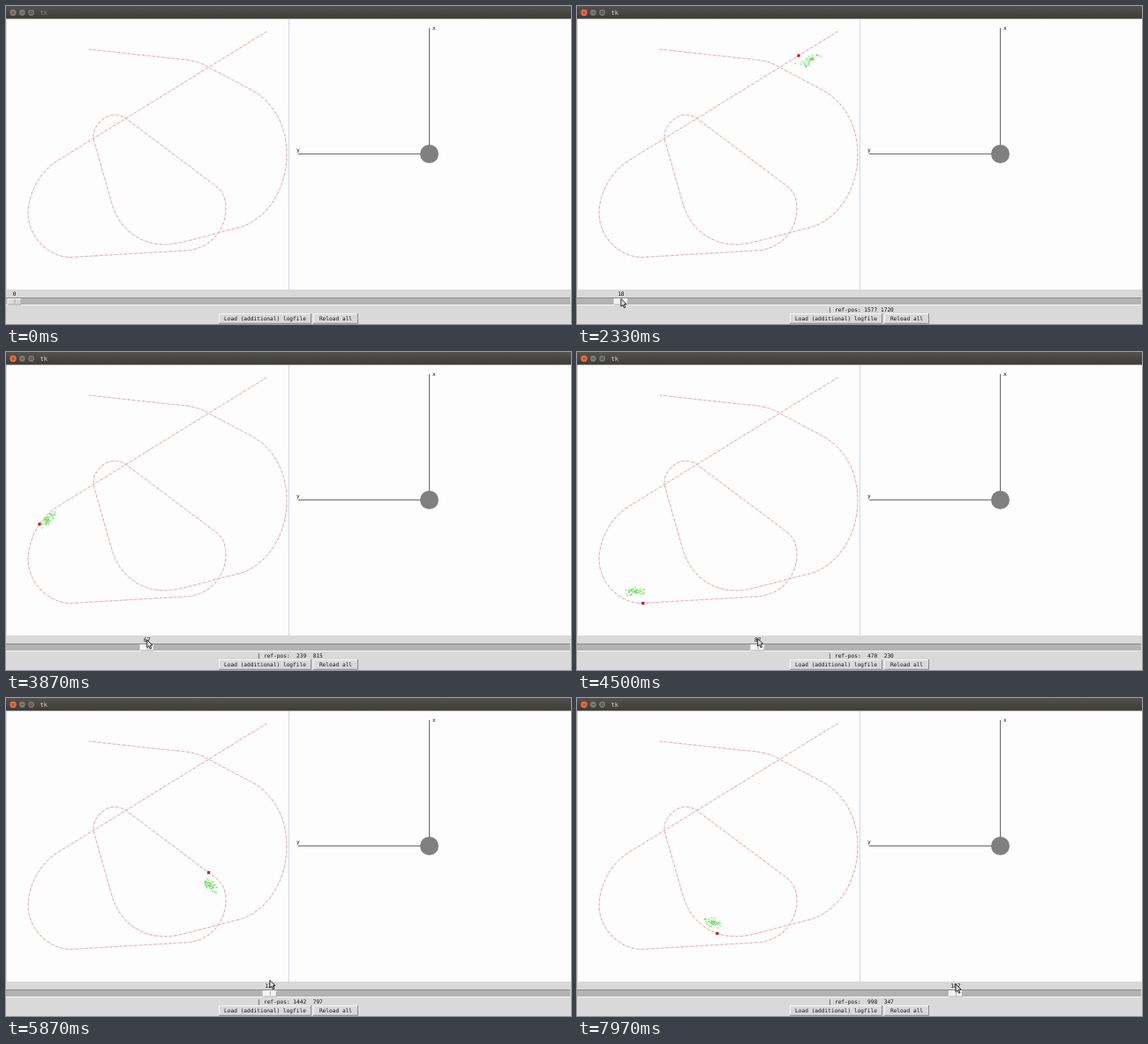
An HTML page that plays this animation: 640x360 px, repeating every 8000 ms.

```html
<!DOCTYPE html>
<html lang="en">
<head>
<meta charset="utf-8">
<title>tk</title>
<style>
  html, body { margin: 0; width: 100%; height: 100%; overflow: hidden; background: #fdfdfd; }
  svg { display: block; width: 100vw; height: 100vh; }
  text { font: 6.18px "DejaVu Sans Mono", monospace; fill: #111; white-space: pre; }
  path { fill: none; }
  .mid { text-anchor: middle; }
  #title { font-size: 7px; fill: #8d8b86; }
  #close, .button { fill: #7b7a75; }
  #knob { fill: #d9d9d9; }
  .focused #title { fill: #dfdbd2; }
  .focused #close { fill: #ee6a40; }
  .focused #knob { fill: #f4f4f4; }
  .axis { stroke: #6a6a6a; }
  .trail { stroke: #efd0ee; }
  .dots { stroke: #f5a884; stroke-width: 1.1; stroke-dasharray: 1.8 3.8; }
  .cloud { stroke: #70e060; }
  .light { stroke: #f6f6f6; }
  .dark { stroke: #8a8a8a; }
</style>
</head>
<body>
<svg viewBox="0 0 640 360">
  <defs>
    <linearGradient id="bar" x2="0" y2="1">
      <stop offset="0" stop-color="#53524d"/>
      <stop offset="1" stop-color="#3c3b37"/>
    </linearGradient>
  </defs>
  <rect width="640" height="360" fill="#fdfdfd"/>
  <rect width="640" height="14.5" fill="url(#bar)"/>
  <circle id="close" cx="8" cy="7.5" r="3.7"/>
  <circle class="button" cx="18.3" cy="7.5" r="3.4"/>
  <circle class="button" cx="28.6" cy="7.5" r="3.4"/>
  <path d="M6.7 6.2l2.6 2.6m0-2.6l-2.6 2.6M16.8 7.5h3M27.3 6.3h2.6v2.4h-2.6z" stroke="#403e3a" stroke-width=".7"/>
  <text id="title" x="38.5" y="10">tk</text>

  <path d="M.5 15V321M320.5 15V321" stroke="#d6d6e8"/>
  <path class="trail" d="M295 29L60 174C38 187 25 212 25 236C26 262 48 284 73 284.5L207 276.6
    C235 273 249 250 249 230C249 215 244 209 238 204L138 129C126 119 112 123 104 134
    C99 140 98 147 100 154L120 224C128 251 150 270 180 270C195 270 215 263 267 250
    C298 239 318 205 318 168C318 132 300 106 276 94L225 67C217 62 200 60 190 59.5L94 49"/>
  <path class="dots"/>
  <path class="cloud"/>
  <rect id="marker" width="3.2" height="3.2" fill="#dc1010"/>

  <path class="axis" d="M479.5 25V167.5H331"/>
  <circle cx="479.5" cy="167.5" r="10.5" fill="#808080"/>
  <text x="483" y="27">x</text>
  <text x="329" y="165">y</text>

  <rect y="321" width="640" height="39" fill="#d9d9d9"/>
  <rect y="330" width="639" height="8.5" fill="#b3b3b3"/>
  <path class="dark" d="M0 330.5H639"/>
  <path class="light" d="M0 338.5H639"/>
  <g id="handle">
    <rect id="knob" x="-8" y="331" width="16" height="7.5"/>
    <path class="light" d="M-7.5 338V331.5H8"/>
    <path class="dark" d="M-7.5 338H7.5V331.5M.5 332V337" stroke-width=".7"/>
    <text id="value" class="mid" y="328.3"></text>
  </g>
  <text id="status" x="284.5" y="345.6"></text>
  <g id="buttons"></g>
  <path id="cursor" d="M0 0V8.6L2 6.9L3.5 10.2L5 9.5L3.5 6.3L6.2 6Z"
        style="fill:#e2e2e2" stroke="#151515" stroke-width=".9"/>
</svg>
<script>
const LOOP = 8000, FOCUS = 850;
const $ = s => document.querySelector(s);
const set = (el, attrs) => Object.entries(attrs).forEach(([k, v]) => el.setAttribute(k, v));
const clamp = x => Math.min(1, Math.max(0, x));

// time, slider value, distance along the trail, cursor height
const keys = [
  [1000, 0, 0, 335], [1330, 6, 0, 334], [1700, 6.5, 0, 333], [2530, 22, 68, 331],
  [3170, 46.3, 189, 329.5], [3870, 67.3, 306.5, 326], [5070, 106.3, 536, 323],
  [6700, 154.3, 805, 316], [7970, 187.3, 975.5, 324]
];

function sample(t) {
  const i = Math.max(1, keys.findIndex(k => k[0] >= t));
  const b = t > keys.at(-1)[0] ? keys.at(-1) : keys[i], a = keys[keys.indexOf(b) - 1];
  const k = Math.max(0, (t - a[0]) / (b[0] - a[0]));
  return a.slice(1).map((n, j) => n + (b[j + 1] - n) * k);
}

function random(seed) {
  let s = seed * 7919 + 17;
  return () => (s = (s * 16807) % 2147483647) / 2147483647;
}

const trail = $('.trail');
set($('.dots'), { d: trail.getAttribute('d') });

const button = (x, w, label) => `
  <path class="light" d="M${x + .5} 359V348.5H${x + w}"/>
  <path class="dark" d="M${x} 359.3H${x + w - .5}V348"/>
  <text class="mid" x="${x + w / 2}" y="356.2">${label}</text>`;
$('#buttons').innerHTML = button(241, 105, 'Load (additional) logfile') + button(348, 51, 'Reload all');

// Estimates trail behind the marker, swaying to its left, and gather as the value grows.
function cloudPath(v, dist, p) {
  const rnd = random(v + 1);
  const spread = () => (rnd() + rnd() + rnd() - 1.5) * 1.9;
  const q = trail.getPointAtLength(dist + 2);
  const heading = Math.atan2(q.y - p.y, q.x - p.x);
  const c = Math.cos(heading), s = Math.sin(heading);
  const left = 9.5 + 7.5 * Math.cos((v - 104) / 108 * 2 * Math.PI);
  const loose = Math.exp(-Math.max(0, v - 6) / 8);
  return Array.from({ length: 55 - 45 * loose }, () => {
    const along = spread() * (5 + 6 * loose) - 9 * (1 - loose);
    const side = spread() * (2.2 + 4 * loose) + left;
    const a = rnd() * 2 * Math.PI;
    return `M${p.x + along * c + side * s} ${p.y + along * s - side * c}l${Math.cos(a) * 1.9} ${Math.sin(a) * 1.9}`;
  }).join('');
}

const pad = n => String(Math.round(n)).padStart(4);

function draw(now) {
  const t = now % LOOP;
  const [value, dist, height] = sample(t);
  const v = Math.floor(value), started = v > 0;
  const p = trail.getPointAtLength(dist);
  const center = 9.5 + v * 2.243;
  const approach = clamp((FOCUS - t) / 600);

  $('svg').classList.toggle('focused', t >= FOCUS);
  set($('#handle'), { transform: `translate(${center})` });
  set($('#cursor'), { transform: `translate(${center + 50 * approach} ${height + 31 * approach})` });
  set($('#marker'), { x: p.x - 1.6, y: p.y - 1.6, visibility: started ? 'visible' : 'hidden' });
  set($('.cloud'), { d: started ? cloudPath(v, dist, p) : '' });
  $('#value').textContent = v;
  $('#status').textContent = started
    ? `| ref-pos: ${pad(p.x / .1592)} ${pad((319.7 - p.y) / .1532)}` : '';
  requestAnimationFrame(draw);
}
draw(performance.now());
</script>
</body>
</html>
```
